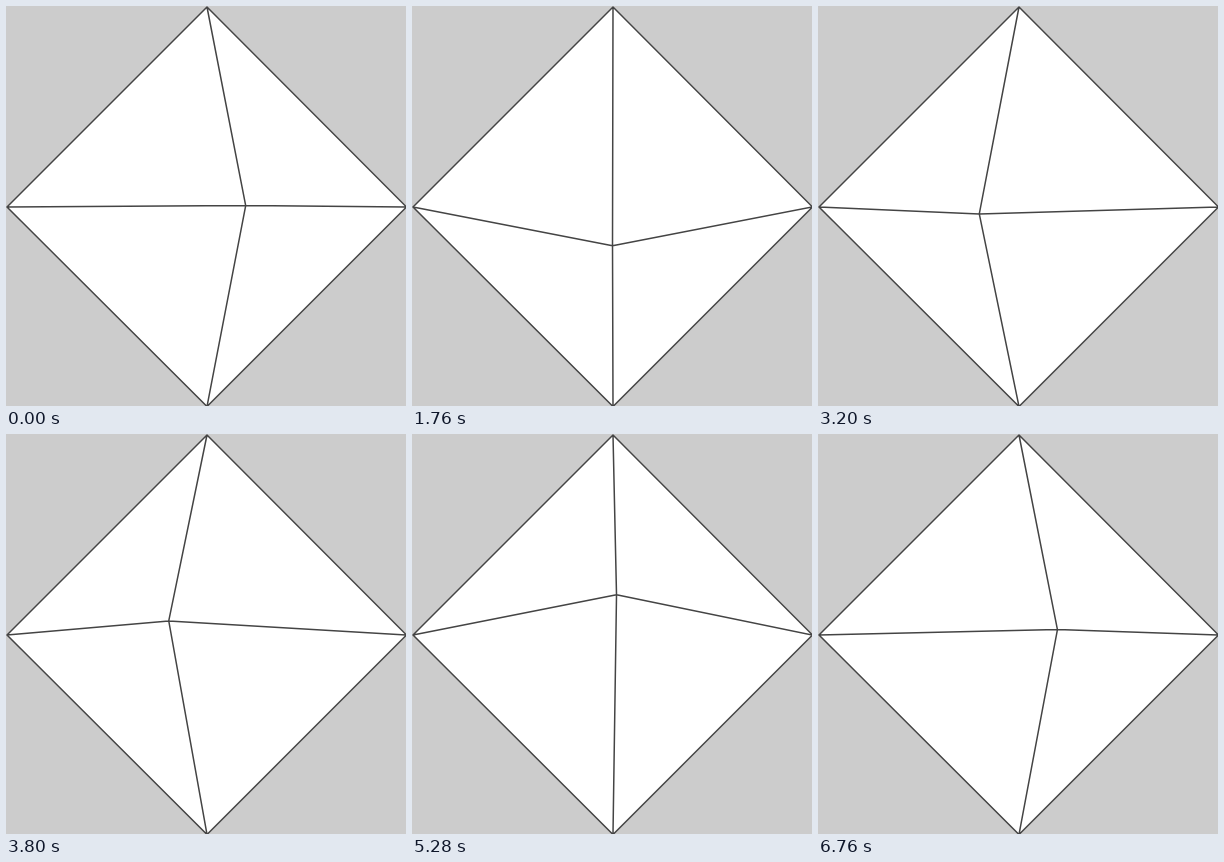
Recreate the animation shown at these times as an HTML page. Size 400x400 px, loop 6.8 s.

```html
<!DOCTYPE html>
<html lang="en">
<head>
<meta charset="utf-8">
<title>Turning pyramid</title>
<style>
  html, body { margin: 0; width: 100%; height: 100%; overflow: hidden; background: #ccc; }
  svg { display: block; width: 100%; height: 100%; }
  path { fill: #fff; stroke: #444; stroke-width: 1.5; stroke-linejoin: round; }
</style>
</head>
<body>
<svg viewBox="0 0 400 400"><path/></svg>
<script>
const LOOP = 6800, TICK = 40;
const CENTRE = 200.1, RADIUS = 39.6;
const START = -0.8, STEP = 2.2; // degrees
const PAUSES = [10, 24, 32, 82, 100, 118, 136, 154]; // ticks on which the apex rests
const corners = [[1, 201], [201, 1], [400.5, 201], [201, 400.5]];
const pyramid = document.querySelector('path');

function draw(time) {
  const tick = Math.floor((time % LOOP) / TICK);
  const steps = tick - PAUSES.filter(p => p <= tick).length;
  const angle = (START + STEP * steps) * Math.PI / 180;
  const apex = [CENTRE + RADIUS * Math.cos(angle), CENTRE + RADIUS * Math.sin(angle)];
  const edges = corners.map(corner => `M${corner}L${apex}`);
  pyramid.setAttribute('d', `M${corners.join('L')}Z${edges.join('')}`);
}

const begin = performance.now();
function loop() {
  draw(performance.now() - begin);
  requestAnimationFrame(loop);
}
loop();
</script>
</body>
</html>
```
